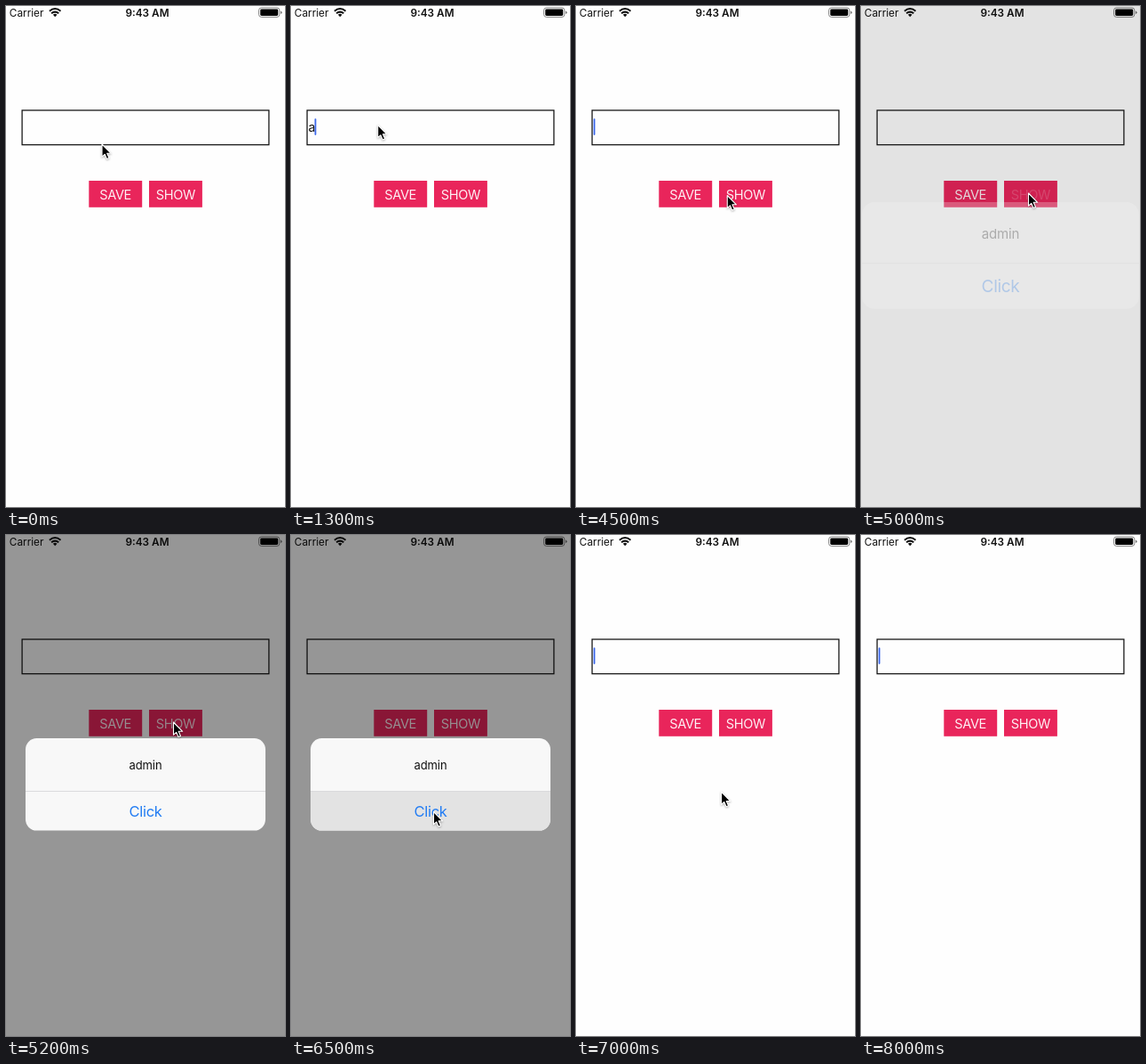
An HTML page for the animation above (8100 ms loop, 314x562 px).

```html
<!DOCTYPE html>
<html lang="en">
<head>
<meta charset="utf-8">
<title>Save and show</title>
<style>
  html, body { margin: 0; width: 100%; height: 100%; overflow: hidden; background: #fff; }
  svg { display: block; width: 100vw; height: 100vh; }
  text { font-family: Inter, "Liberation Sans", sans-serif; }
  .mid { text-anchor: middle; }
  .label { font-size: 14.6px; letter-spacing: -.4px; fill: #fff; fill-opacity: .93; }
</style>
</head>
<body>
<svg viewBox="0 0 314 562" preserveAspectRatio="none">
  <rect width="314" height="562" fill="#fefefe"/>

  <g fill="#111">
    <text x="3.8" y="11.5" font-size="11.8">Carrier</text>
    <text class="mid" x="159" y="11.5" font-size="11.8" font-weight="600">9:43 AM</text>
    <g fill="none" stroke="#111" stroke-width="2">
      <path d="M48.9 5.7Q55.2 .4 61.5 5.7"/>
      <path d="M51.1 8.3Q55.2 4.9 59.3 8.3"/>
    </g>
    <path d="M52.9 9.7Q55.2 7.9 57.5 9.7L55.2 12.2Z"/>
    <rect x="284.6" y="2" width="23.2" height="10.4" rx="2.8" fill="none" stroke="#777" stroke-width=".9"/>
    <rect x="286.2" y="3.5" width="20" height="7.4" rx="1.4" fill="#000"/>
    <path d="M309 5.4Q310.6 6 310.6 7.2T309 9Z" fill="#777"/>
  </g>

  <rect x="18.1" y="117" width="277.8" height="38.7" fill="none" stroke="#111" stroke-width="1.25"/>
  <text id="field" x="19.5" y="140.8" font-size="14.2" letter-spacing="-.4" fill="#111"></text>
  <rect id="caret" y="126.3" width="1.8" height="18.6" rx=".8" fill="#3a66ea"/>

  <g fill="#e9255b">
    <rect x="93.3" y="196" width="59.9" height="29.8"/>
    <rect x="161" y="196" width="59.9" height="29.8"/>
  </g>
  <text id="save" class="label mid" x="123.1" y="216.5">SAVE</text>
  <text id="show" class="label mid" x="190.9" y="216.5">SHOW</text>

  <rect id="dim" width="314" height="562"/>
  <g id="card">
    <rect x="22" y="228" width="270" height="103.6" rx="12.5" fill="#f8f8f8"/>
    <path id="row" d="M22 287.6H292V319.1A12.5 12.5 0 0 1 279.5 331.6H34.5A12.5 12.5 0 0 1 22 319.1Z" fill="#e3e3e3"/>
    <path d="M22 287.5H292" stroke="#d9d9db" stroke-width=".9"/>
    <text class="mid" x="157" y="263.2" font-size="13" letter-spacing="-.1" fill="#111">admin</text>
    <text class="mid" x="157" y="315.7" font-size="16.5" letter-spacing="-.3" fill="#227cf3">Click</text>
  </g>

  <path id="cursor" d="M0 0V14.2L3.2 11.3L5.5 16.6L8 15.5L5.7 10.3H10.2Z"
    fill="#000" stroke="#fff" stroke-width="1.1" stroke-linejoin="round"
    style="filter:drop-shadow(0 1px 1px rgba(0,0,0,.3))"/>
</svg>
<script>
const LOOP = 8100, STEP = 100, WORD = "admin";
const KEYS = [1200, 1900, 2100, 2300, 2500];
const SAVED = 3500, OPEN = 4900, CLOSE = 6600;

// Pointer stops: time, x, y
const STOPS = [
  [0, 108, 155], [100, 108, 155], [500, 97.7, 133.5], [2600, 97.7, 133.5],
  [3200, 122.5, 211.5], [3900, 122.5, 211.5], [4300, 152, 215], [4700, 188.5, 210],
  [5500, 188.5, 210], [6200, 160.5, 310.5], [6900, 160.5, 310.5],
  [7250, 176, 198], [7700, 190, -22], [8100, 190, -22]
];

const $ = id => document.getElementById(id);
const [field, caret, save, show, dim, card, row, cursor] =
  ["field", "caret", "save", "show", "dim", "card", "row", "cursor"].map($);

const within = (t, a, b) => t >= a && t < b;
const clamp = v => Math.min(1, Math.max(0, v));
const ease = v => { v = clamp(v); return v * v * (3 - 2 * v); };
const ramp = (t, start, span) => ease((t - start) / span);

function pointer(t) {
  const i = STOPS.findIndex(s => s[0] > t);
  const [t0, x0, y0] = STOPS[i - 1], [t1, x1, y1] = STOPS[i];
  const k = ramp(t, t0, t1 - t0);
  return [x0 + (x1 - x0) * k, y0 + (y1 - y0) * k];
}

function caretOn(t) {
  const blink = start => (t - start) % 1000 < 500;
  if (within(t, 700, SAVED)) return true;
  if (within(t, SAVED, 4700)) return blink(SAVED);
  return t >= 6700 && blink(6700);
}

// Label fades quickly on touch and returns after release
const press = (t, down, up) => 1 - .8 * (ramp(t, down, 100) - ramp(t, up, 250));

function draw(t) {
  const typed = t < SAVED ? KEYS.filter(k => k <= t).length : 0;
  field.textContent = WORD.slice(0, typed);
  caret.setAttribute("x", 19.7 + (typed ? field.getComputedTextLength() - .7 : 0));
  caret.setAttribute("opacity", caretOn(t) ? 1 : 0);

  save.setAttribute("opacity", press(t, 3350, 3500));
  show.setAttribute("opacity", press(t, 4750, 5000));

  const opened = ramp(t, OPEN, 300);
  const shown = opened - ramp(t, CLOSE, 318);
  const scale = 1.21 - .21 * opened;
  dim.setAttribute("opacity", .41 * shown);
  card.setAttribute("opacity", shown);
  card.setAttribute("transform", `translate(157 279.8) scale(${scale}) translate(-157 -279.8)`);
  row.setAttribute("opacity", within(t, 6450, CLOSE) ? 1 : 0);

  cursor.setAttribute("transform", `translate(${pointer(t)})`);
}

const begin = performance.now();
function tick() {
  const t = (performance.now() - begin) % LOOP;
  draw(Math.floor(t / STEP) * STEP);
  requestAnimationFrame(tick);
}
tick();
</script>
</body>
</html>
```
